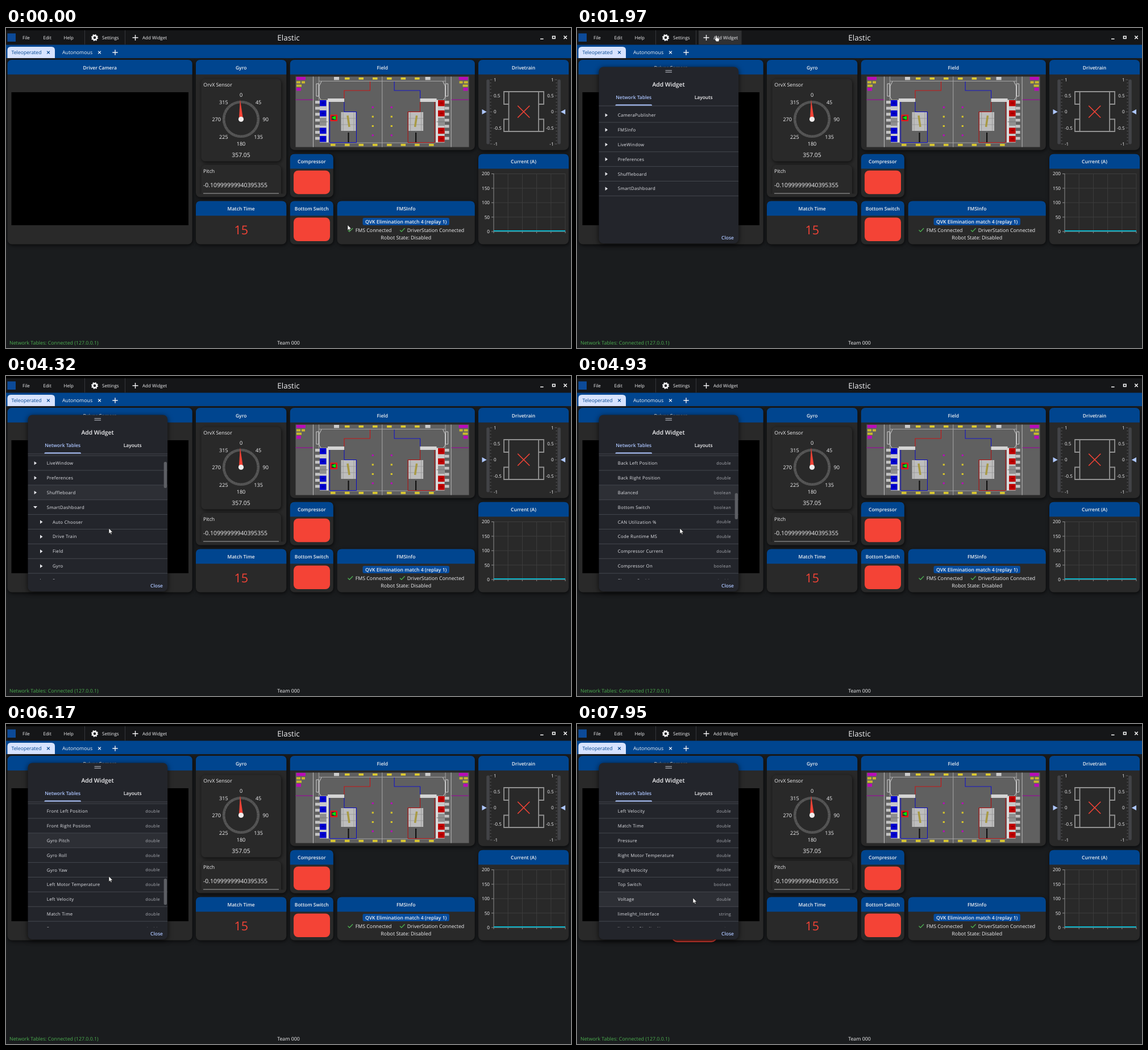
Write an HTML page that moves like this. It is 994x563 px and loops after 8 s.

```html
<!DOCTYPE html>
<html lang="en">
<head>
<meta charset="utf-8">
<title>Dashboard</title>
<style>
  html, body { margin: 0; width: 100%; height: 100%; overflow: hidden; background: #1a1c1e; }
  svg { display: block; width: 994px; height: 563px; font-family: "Open Sans", "Noto Sans", sans-serif; text-rendering: geometricPrecision; }
  text { white-space: pre; }
  .m { text-anchor: middle; }
  .e { text-anchor: end; }
  .b { font-weight: 600; }
  .row { letter-spacing: .3px; }
  .card { filter: drop-shadow(1px 2px 3px #000a); }
</style>
</head>
<body>
<svg id="stage" viewBox="0 0 994 563"></svg>
<script>
const BLUE = '#00458f', RED = '#f44336', CARD = '#292929', PALE = '#adc6ff', GREEN = '#4caf50';
const ROW = 25.87, LIST_TOP = 140.4, DURATION = 8000;

// Drawing helpers: all return SVG markup
const rect = (x, y, w, h, fill, r = 0, attrs = '') =>
  `<rect x="${x}" y="${y}" width="${w}" height="${h}" rx="${r}" fill="${fill}" ${attrs}/>`;
const path = (d, stroke, width = 1, fill = 'none') =>
  `<path d="${d}" stroke="${stroke}" stroke-width="${width}" fill="${fill}"/>`;
const circle = (x, y, r, fill, attrs = '') =>
  `<circle cx="${x}" cy="${y}" r="${r}" fill="${fill}" ${attrs}/>`;
const text = (x, y, s, size = 8.8, cls = '', fill = '#f2f2f4') =>
  `<text x="${x}" y="${y + size * .35}" font-size="${size}" class="${cls}" fill="${fill}">${s}</text>`;
const cross = (x, y, r, color, width = 1.2) =>
  path(`M${x - r} ${y - r}l${2 * r} ${2 * r}m0 ${-2 * r}l${-2 * r} ${2 * r}`, color, width);
const plus = (x, y, r) => path(`M${x - r} ${y}h${2 * r}M${x} ${y - r}v${2 * r}`, '#f2f2f4', 1.4);
const repeat = (n, fn) => Array.from({ length: n }, (_, i) => fn(i)).join('');

const card = (x, y, w, h, title, body = '') => `
  <g class="card">${rect(x, y, w, h, CARD, 8)}
  <path d="M${x} ${y + 25.7}v-17.7q0-8 8-8h${w - 16}q8 0 8 8v17.7z" fill="${BLUE}"/></g>
  ${text(x + w / 2, y + 13.7, title, 8.5, 'm b')}${body}`;

function titleBar() {
  return rect(0, 0, 994, 30, '#151618') + rect(0, 0, 994, 4, '#000') +
    `<g id="button">${rect(214, 4.5, 75.5, 24.5, '#303133')}</g>` +
    `<g id="ripple">${circle(246, 17, 12.5, '#48494c')}</g>` +
    rect(2.5, 9.5, 14.5, 14.5, '#0c4a98') +
    text(29, 17, 'File', 8) + text(65.5, 17, 'Edit', 8) + text(101.5, 17, 'Help', 8) +
    path('M138.5 4v25M209.5 4v25', '#36373a') +
    circle(156, 17, 3.6, 'none', 'stroke="#f2f2f4" stroke-width="2.8"') +
    circle(156, 17, 5.3, 'none', 'stroke="#f2f2f4" stroke-width="1.6" stroke-dasharray="2.1 2.06"') +
    text(169, 17, 'Settings', 8) + plus(227.5, 17, 5) + text(240, 17, 'Add Widget', 8) +
    text(497, 17, 'Elastic', 13.5, 'm') +
    path('M940 19.3h5.5', '#fff', 1.5) + path('M961.5 14.5h4.5v4h-4.5z', '#fff', 1.5) + cross(984, 16.5, 2.7, '#fff', 1.5) +
    rect(0, 29.5, 994, 23.5, BLUE) +
    `<path d="M2.5 53v-14q0-6 6-6h71.5q6 0 6 6v14z" fill="#d7e3ff"/>` +
    text(9.5, 43, 'Teleoperated', 8.7, '', BLUE) + cross(74.5, 43, 2.4, BLUE) +
    text(99, 43, 'Autonomous') + cross(164.5, 43, 2.4, '#fff') + plus(192, 43, 4.7);
}

function gyro() {
  const labels = repeat(8, i => {
    const a = i * Math.PI / 4;
    return text(413.5 + 43.3 * Math.sin(a), 161 - 43.3 * Math.cos(a), i * 45, 9.1, 'm');
  });
  return `<g clip-path="url(#gyroClip)"><g class="card">
    ${rect(343.5, 89.5, 140.5, 145, CARD, 7)}${rect(343.5, 241, 140.5, 70, CARD, 7)}</g></g>` +
    text(347.3, 100, 'OrvX Sensor') +
    circle(413.5, 160.5, 30.3, 'none', 'stroke="#383838" stroke-width="4.6"') +
    circle(413.5, 160.5, 30.3, 'none', 'stroke="#767676" stroke-width="4.6" stroke-dasharray=".7 .887"') + labels +
    `<path d="M411.9 125.5l5.2 34.8h-7.2z" fill="${RED}" />` + circle(413.5, 160.5, 4.6, '#f0eded') +
    text(413.5, 223.5, '357.05', 10.4, 'm') +
    text(347, 252, 'Pitch') + text(347, 276.5, '-0.10999999940395355', 10.4) +
    path('M347 291h133', '#a5a5a5') +
    `<g id="gyroBar">${rect(480.5, 85.5, 5.2, 192.5, '#6a6a6a', 2.6)}</g>`;
}

// One alliance side of the field; the other is its mirror image
function fieldSide(own, other) {
  return path('M540.5 85v125', '#bbb') + path('M550.5 85v42M550 93.5h112M568 202h94', '#a2a2a2') +
    path('M509 126.3h31', '#8d1b8d', 1.6) +
    rect(511, 86, 16, 5.5, '#b80cb8') + rect(511, 93.5, 7, 4, '#c8b82e') + rect(520, 93.5, 6, 4, '#c8b82e') +
    rect(511, 99.5, 9, 4, '#c8b82e') + rect(511, 105, 8, 5.5, '#b80cb8') +
    rect(577, 86, 9, 5.5, '#ccc') +
    path('M555 94l-4 8v20l3 4M546 98h4v22h-4z', '#d0d0d0') +
    repeat(7, i => rect(544, 128 + i * 10.6, 8, 5, '#c4c4c4')) +
    rect(552, 126.5, 11.5, 75, '#c8c8c8') + rect(563.5, 126.5, 4, 75, '#dedede') +
    [127, 145, 175.5, 190].map(y => rect(552, y, 11.5, 10.5, own) + path(`M555 ${y + 5}h5`, '#0006')).join('') +
    rect(552, 158, 11.5, 14, '#8f8f8f') + path('M544 165h22', '#777') +
    rect(566, 124, 29, 6, '#d4d4d4') +
    path('M595 130v17.5h21.5V201.500H569.500V130', own, .9) +
    path('M640.5 94v16H595v14', other, 1.1) +
    rect(589.5, 148, 26, 33, '#bdbdbd') + path('M593 148v33M612 148v33M589.500 159h26M589.500 170h26', '#959595', .8) +
    path('M601 154l3 20', '#a89a45', 3.5) + path('M602.500 184v17', '#111', 2.2) +
    circle(645.3, 139.5, 1.8, '#b80cb8') + circle(645.3, 188.7, 1.8, '#b80cb8') +
    rect(643.7, 154.5, 3.2, 3, '#d6c52c') + rect(643.7, 171, 3.2, 3, '#d6c52c') +
    [596, 620.5, 645].map(x => rect(x, 87, 8.5, 3.8, '#dcca30')).join('') +
    [571, 596, 620.5, 645].map(x => rect(x, 203.8, 8.5, 3.8, '#dcca30')).join('');
}

function field() {
  return `<g clip-path="url(#fieldClip)">${rect(509, 85, 306, 125, '#606060')}
    ${fieldSide('#0000d0', '#c81414')}
    <g transform="matrix(-1 0 0 1 1323.6 0)">${fieldSide('#c00000', '#1414c8')}</g>
    ${path('M661.8 85v125', '#aaa')}</g>` +
    rect(571.5, 153.5, 10.5, 9.5, '#333', 0, 'stroke="#f21818" stroke-width="2"') +
    '<path d="M573 158l7-3.500v7z" fill="#0f0"/>';
}

function drivetrain() {
  const scale = (bar, tick, label, cls, dir) => rect(bar, 90.5, 5.5, 114, '#424347', 2.7) +
    repeat(21, i => path(`M${tick} ${91 + i * 5.65}h${dir * (i % 5 ? 2 : 4)}`, '#77787b', .7)) +
    ['1', '0.5', '0', '-0.5', '-1'].map((s, i) => text(label, 91 + i * 28.25, s, 8, cls)).join('');
  return scale(845.3, 851.5, 858, '', 1) + scale(970.3, 969.5, 963.5, 'e', -1) +
    `<path d="M837.500 143v9l8.200-4.500zM984 143v9l-8.200-4.500z" fill="${PALE}"/>` +
    path('M884.500 112h52.500v70h-52.500zM884.500 112h-8.500v22h8.500M884.500 160.500h-8.500v21.500h8.500M937 112h9v22h-9M937 160.500h9v21.500h-9', '#929292', 1.8) +
    cross(910.7, 147.3, 10.5, RED, 1.6);
}

function currentChart() {
  return repeat(5, i => path(`M858 ${256.5 + i * 25.4}h126`, '#3d3d3d') + path(`M854 ${256.5 + i * 25.4}h4`, '#8d8d8d') +
      path(`M${883.2 + i * 25.2} 256.500v101.500`, '#3d3d3d') + path(`M${883.2 + i * 25.2} 358v3`, '#8d8d8d') +
      text(851, 256.5 + i * 25.4, 200 - i * 50, 8.2, 'e')) +
    path('M858 256v105M858 358h126', '#8d8d8d') + path('M858 356.800h126', '#00bcd4', 1.8);
}

function matchInfo() {
  const check = x => path(`M${x} 355.500l2.800 2.800 5.800-6`, GREEN, 1.3);
  return rect(627.5, 334, 152.5, 13, '#064c9e', 3) +
    text(703.7, 341, 'QVK Elimination match 4 (replay 1)', 8.6, 'm b') +
    check(601.5) + text(614.7, 355.5, 'FMS Connected') + check(693) + text(705.7, 355.5, 'DriverStation Connected') +
    text(703.7, 369, 'Robot State: Disabled', 8.9, 'm');
}

const roots = ['CameraPublisher', 'FMSInfo', 'LiveWindow', 'Preferences', 'Shuffleboard', 'SmartDashboard'];
const folders = ['Auto Chooser', 'Drive Train', 'Field', 'Gyro', 'Power', 'Scheduler'];
const values = ['Back Left Position', 'Back Right Position', 'Balanced', 'Bottom Switch', 'CAN Utilization %',
  'Code Runtime MS', 'Compressor Current', 'Compressor On', 'Elevator Position', 'Elevator Velocity',
  'Extension Position', 'Extension Velocity', 'Front Left Position', 'Front Right Position', 'Gyro Pitch', 'Gyro Roll',
  'Gyro Yaw', 'Left Motor Temperature', 'Left Velocity', 'Match Time', 'Pressure', 'Right Motor Temperature',
  'Right Velocity', 'Top Switch', 'Voltage', 'limelight_Interface', 'limelight_PipelineName', 'limelight_Stream'];
const typeOf = name => /^lime/.test(name) ? 'string' : /Balanced|Switch|On$/.test(name) ? 'boolean' : 'double';

const rowY = i => LIST_TOP + (i + .5) * ROW;
const row = (i, x, name) => text(x, rowY(i), name, 7.8, 'row', '#e4e5ea') + path(`M38.500 ${rowY(i) + 12.7}h245.500`, '#44474e');
const arrow = (i, x) => `<path d="M${x} ${rowY(i) - 3.2}v6.400l4.500-3.200z" fill="#e4e5ea"/>`;

function dialog() {
  const rootRows = roots.map((name, i) => row(i, 71.8, name) + (i < 5 ? arrow(i, 49.6) : '')).join('');
  const childRows = folders.map((name, i) => row(i + 6, 82, name) + arrow(i + 6, 60)).join('') +
    values.map((name, i) => row(i + 12, 71.8, name) + text(271, rowY(i + 12), typeOf(name), 7.4, 'row e', '#a9abb2')).join('');
  return `<g id="dialog"><g style="filter:drop-shadow(0 2px 5px #000b)">${rect(38.5, 68.5, 245.7, 310.5, '#23252b', 8)}</g>
    ${path('M155.500 74.700h11.500M155.500 77.700h11.500', '#c4c6d0', 1.1)}
    ${text(161, 99, 'Add Widget', 10.3, 'm b')}
    ${text(99.7, 121.7, 'Network Tables', 8.45, 'm b', PALE)}${text(222.7, 121.7, 'Layouts', 8.45, 'm b')}
    ${path('M38.500 137h245.500', '#44474e')}
    <path d="M67.500 136.500v-.5q0-1.500 1.500-1.500h61.500q1.500 0 1.500 1.500v.5z" fill="${PALE}"/>
    <g clip-path="url(#listClip)"><g id="list">
      <g id="hover">${rect(38.5, LIST_TOP, 245.7, ROW, '#2d2f35')}</g>${rootRows}
      <g id="closed">${arrow(5, 49.6)}</g>
      <g id="open"><path d="M48 ${rowY(5) - 2}h7l-3.500 4z" fill="#e4e5ea"/>${childRows}</g></g></g>
    <g id="listBar">${rect(277.7, 0, 5.3, 46, '#5c5e63', 2.6)}</g>
    ${text(265, 369.3, 'Close', 8.5, 'm b', PALE)}</g>`;
}

const clip = (id, x, y, w, h) => `<clipPath id="${id}">${rect(x, y, w, h, '#fff')}</clipPath>`;
const $ = id => document.getElementById(id);

$('stage').innerHTML = '<defs>' + clip('gyroClip', 334, 84, 159, 207.5) + clip('fieldClip', 509.5, 85.5, 305, 124) +
  clip('listClip', 38.5, 137.5, 246, 220.5) + '</defs>' + rect(0, 0, 994, 563, '#1a1c1e') + titleBar() +
  card(2.7, 56, 325, 324.5, 'Driver Camera', rect(9.5, 113, 311.5, 234, '#000')) +
  card(334, 56, 159.3, 241.5, 'Gyro', gyro()) +
  card(499.8, 56, 325, 158.7, 'Field', field()) +
  card(831, 56, 159, 158.7, 'Drivetrain', drivetrain()) +
  card(499.8, 221.7, 76, 76, 'Compressor', rect(506, 250.7, 64, 41.5, RED, 8)) +
  card(831, 221.7, 159, 158.8, 'Current (A)', currentChart()) +
  card(334, 304.5, 159.3, 76, 'Match Time', text(413.7, 355, '15', 21.5, 'm', RED)) +
  card(499.8, 304.5, 76, 76, 'Bottom Switch', rect(506, 333.5, 64, 41.5, RED, 8)) +
  card(582.7, 304.5, 242, 76, 'FMSInfo', matchInfo()) +
  text(6, 554, 'Network Tables: Connected (127.0.0.1)', 8.8, '', GREEN) + text(497, 554, 'Team 000', 8.8, 'm') +
  `<g id="preview">${rect(167.5, 305.5, 78, 77.3, '#f4433666', 9, `stroke="${RED}" stroke-width="2"`)}</g>` + dialog() +
  `<g id="cursor"><path id="pointer" d="M0 0v9.500l2.200-2 1.500 3.300 1.500-.7-1.500-3.200h3z" fill="#fff" stroke="#111" stroke-width=".6"/>
   <path id="hand" d="M-1 .8q1-1.500 2 0v3.500l3.500 1q1 .4.8 1.500l-.8 4h-4.500l-3-4.300q0-1.300 1.200-.7l.8.8z" fill="#fff" stroke="#222" stroke-width=".5"/></g>`;

// Pointer moves: start, end, steps, target x, target y
const moves = [[1110, 1400, 4, 245, 13], [2290, 2440, 3, 245, 50], [2620, 2980, 5, 159, 282],
  [3810, 4000, 3, 181, 268], [7480, 7720, 4, 204, 306]];
// Wheel: time of each jump, first visible row after it
const wheel = [[-DURATION, 0], [4280, 2], [4360, 4], [4440, 8], [4520, 10], [4930, 12], [5010, 14], [5090, 16],
  [5260, 18], [5400, 20], [5560, 22], [6170, 24], [6370, 28], [6750, 30]];

function pointerAt(t) {
  let x = 601, y = 346.5;
  for (const [start, end, steps, tx, ty] of moves) {
    if (t < start) break;
    const p = Math.min(1, (Math.floor((t - start) / (end - start) * (steps - 1)) + 1) / steps);
    const eased = p * p * (3 - 2 * p);
    x += (tx - x) * eased;
    y += (ty - y) * eased;
  }
  return [x, y];
}

const firstRowAt = t => wheel.filter(([time]) => time <= t).pop() || wheel[0];
const between = (t, a, b) => t >= a && t < b;
const show = (id, opacity) => $(id).setAttribute('opacity', +opacity);
const shift = (id, x, y) => $(id).setAttribute('transform', `translate(${x} ${y})`);
const fadeOut = (t, start, length) => Math.max(0, Math.min(1, 1 - (t - start) / length));

function draw() {
  const t = performance.now() % DURATION;
  const [x, y] = pointerAt(t);
  const [lastScroll, top] = firstRowAt(t);
  const onButton = between(t, 1400, 2290);
  shift('cursor', x, y);
  show('hand', onButton);
  show('pointer', !onButton);
  show('button', t >= 1400 ? fadeOut(t, 2290, 150) : 0);
  show('ripple', between(t, 1810, 1970));
  show('gyroBar', between(t, 1207, 1970));
  show('dialog', t >= 1970);
  show('open', t >= 3480);
  show('closed', t < 3480);
  shift('list', 0, -top * ROW);
  shift('listBar', 0, 140 + top * 5.5);
  show('listBar', fadeOut(t, lastScroll + 700, 250));
  // The highlight stays on the old row for a moment after each jump
  const settledTop = t - lastScroll < 200 ? firstRowAt(lastScroll - 1)[1] : top;
  shift('hover', 0, (settledTop + Math.floor((y - LIST_TOP) / ROW)) * ROW);
  show('hover', t >= 2800);
  show('preview', t >= 7950);
  requestAnimationFrame(draw);
}
draw();
</script>
</body>
</html>
```
